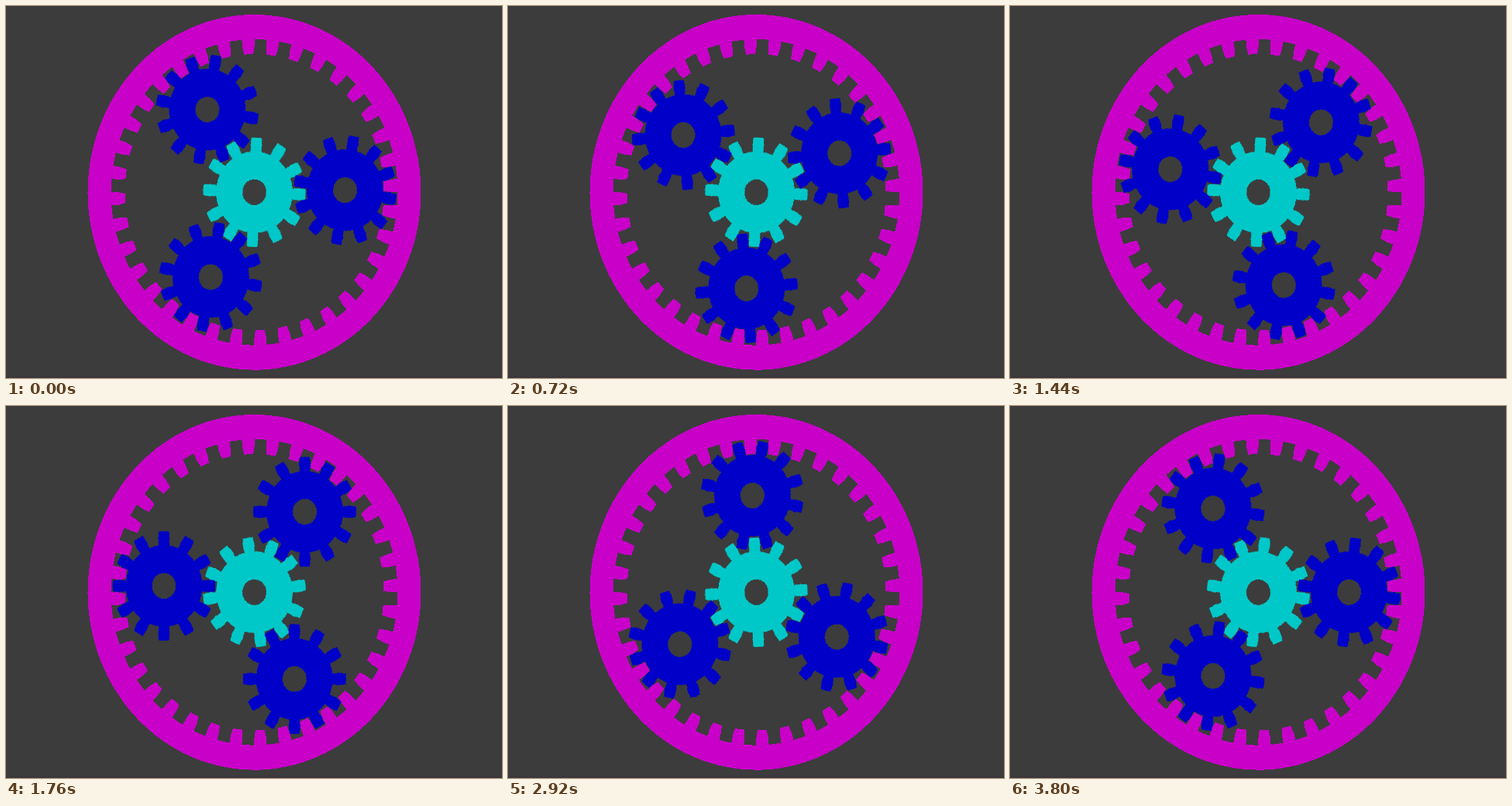
Write an HTML page that moves like this. It is 640 px wide and 480 px high and loops after 3.84 s.

```html
<!DOCTYPE html>
<html lang="en">
<head>
<meta charset="utf-8">
<title>Planetary gears</title>
<style>
  html, body { margin: 0; width: 100%; height: 100%; overflow: hidden; background: #3c3c3c; }
  svg { display: block; width: 640px; height: 480px; shape-rendering: crispEdges; }
  path { fill-rule: evenodd; }
  #ring { fill: #c800c8; transform: rotate(-2.5deg); }
  #sun { fill: #00c8c8; }
  .planet { fill: #0000c8; }
  #sun, #carrier, .planet { animation: 3.84s steps(96) infinite; }
  #sun { animation-name: sun; }
  #carrier { animation-name: carrier; }
  .planet { animation-name: planet; }
  /* 12 / 12 / 36 teeth, ring fixed: the sun turns at four times the carrier speed */
  @keyframes sun { from { transform: rotate(2.5deg); } to { transform: rotate(-477.5deg); } }
  @keyframes carrier { from { transform: rotate(-1.25deg); } to { transform: rotate(-121.25deg); } }
  @keyframes planet { from { transform: rotate(11.25deg); } to { transform: rotate(371.25deg); } }
</style>
</head>
<body>
<svg viewBox="0 0 640 480">
  <rect y="477" width="640" height="3" fill="#3b373a"/>
  <g transform="translate(320.5 240.3) scale(1 1.0667)">
    <path id="ring"/>
    <path id="sun"/>
    <g id="carrier">
      <g transform="translate(117 0)"><path class="planet"/></g>
      <g transform="rotate(120) translate(117 0)"><path class="planet"/></g>
      <g transform="rotate(240) translate(117 0)"><path class="planet"/></g>
    </g>
  </g>
</svg>
<script>
  const point = (r, deg) => {
    const a = deg * Math.PI / 180;
    return `${(r * Math.cos(a)).toFixed(3)} ${(r * Math.sin(a)).toFixed(3)}`;
  };
  const arc = (r, deg) => `A${r} ${r} 0 0 1 ${point(r, deg)}`;
  const circle = r => `M${r} 0A${r} ${r} 0 1 1 ${-r} 0A${r} ${r} 0 1 1 ${r} 0Z`;

  // Toothed outline plus a plain circle: the bore of a gear or the rim of a ring.
  function gear(teeth, root, tip, tipHalf, plain) {
    const step = 360 / teeth, half = step / 4, pitch = (root + tip) / 2;
    let d = '';
    for (let i = 0; i < teeth; i++) {
      const a = i * step - 90;
      d += (i ? arc(root, a - half) : `M${point(root, a - half)}`)
        + `L${point(pitch, a - half)}L${point(tip, a - tipHalf)}`
        + arc(tip, a + tipHalf)
        + `L${point(pitch, a + half)}L${point(root, a + half)}`;
    }
    return d + arc(root, -90 - half) + 'Z' + circle(plain);
  }

  const wheel = gear(12, 49.4, 66.5, 5.5, 15.5);
  document.querySelectorAll('#sun, .planet').forEach(el => el.setAttribute('d', wheel));
  document.getElementById('ring').setAttribute('d', gear(36, 185, 167, 2, 215));
</script>
</body>
</html>
```
